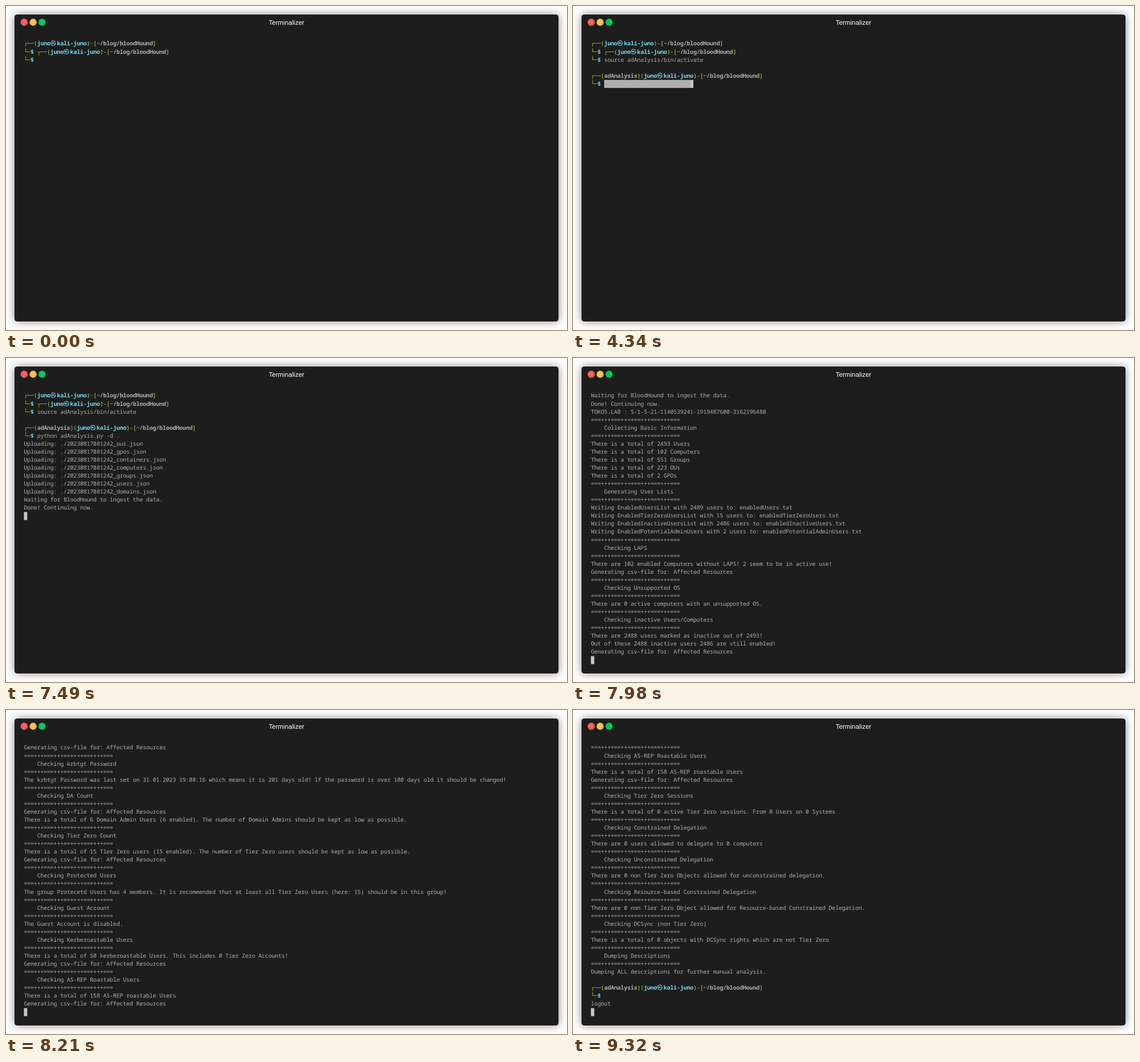
An HTML page that plays this animation: 984x569 px, repeating every 9720 ms.

```html
<!DOCTYPE html>
<html lang="en">
<head>
<meta charset="utf-8">
<title>Terminalizer</title>
<style>
  html, body { margin: 0; width: 100%; height: 100%; overflow: hidden; background: #fff; }
  #stage {
    position: absolute; left: 0; top: 0; width: 1189px; height: 688px;
    transform: scale(.82759, .82703); transform-origin: 0 0;
  }
  #stage div { position: absolute; }
  #frame { left: 18px; top: 18px; width: 1153px; height: 652px; border-radius: 6px;
    background: #1d1d1d; box-shadow: 0 0 18px #888; }
  .dot { top: 9px; width: 15px; height: 15px; border-radius: 50%; }
  #title { top: 9px; width: 100%; text-align: center; color: #fff;
    font: 14px/16px "Liberation Sans", Arial, sans-serif; text-rendering: geometricPrecision; }
  #term { left: 20px; top: 54px; width: 1113px; height: 578px; }
  #text { left: 0; top: -1px; width: 100%; color: #afafaf; white-space: pre;
    font: 12px/17px "Noto Sans Mono", "Noto Sans CJK KR", "Noto Sans CJK JP", monospace;
    font-variant-ligatures: none; text-rendering: geometricPrecision; }
  #text p { margin: 0; height: 17px; }
  #cursor, #paste { height: 17px; }
  #cursor { width: 7px; background: #c7c7c7; }
  #paste { background: #afafaf; }
  .green { color: #b3e33b; }
  .blue { color: #75dff2; font-weight: bold; }
  .bold { font-weight: bold; }
  .wide { display: inline-block; width: 14px; line-height: 0; letter-spacing: 0; }
</style>
</head>
<body>
<div id="stage">
  <div id="frame">
    <div class="dot" style="left:13px;background:#ff5f58"></div>
    <div class="dot" style="left:32px;background:#ffbd50"></div>
    <div class="dot" style="left:51px;background:#00ca56"></div>
    <div id="title">Terminalizer</div>
    <div id="term">
      <div id="paste"></div>
      <div id="cursor"></div>
      <div id="text"></div>
    </div>
  </div>
</div>
<script>
const LOOP = 9720, ROWS = 34, CELL_W = 7, CELL_H = 17;
const $ = id => document.getElementById(id);
const text = $("text"), cursor = $("cursor"), paste = $("paste");

const span = (cls, s) => `<span class="${cls}">${s}</span>`;
const prompt = env =>
  span("green", "┌──(") +
  (env ? span("bold", "adAnalysis") + span("green", ")(") : "") +
  span("blue", `juno${span("wide", "㉿")}kali-juno`) +
  span("green", ")-[") + span("bold", "~/blog/bloodHound") + span("green", "]");
const ps = span("green", "└─") + span("blue", "$") + " ";

const rule = "===+++===+++===+++===+++===";
const section = (name, ...lines) => [rule, "    " + name, rule, ...lines];
const csv = "Generating csv-file for: Affected Resources";
const total = s => "There is a total of " + s;
const write = (list, n, file) => `Writing ${list} with ${n} users to: ${file}.txt`;

const log = [
  prompt(false),
  ps + prompt(false),
  ps + "source adAnalysis/bin/activate",
  "",
  prompt(true),
  ps + "python adAnalysis.py -d .",
  ..."ous gpos containers computers groups users domains".split(" ")
    .map(s => `Uploading: ./20230817081242_${s}.json`),
  "Waiting for BloodHound to ingest the data.",
  "Done! Continuing now.",
  "TOKO5.LAB : S-1-5-21-1140539241-1919487600-3162196480",
  ...section("Collecting Basic Information",
    ...["2493 Users", "102 Computers", "551 Groups", "223 OUs", "2 GPOs"].map(total)),
  ...section("Generating User Lists",
    write("EnabledUsersList", 2489, "enabledUsers"),
    write("EnabledTierZeroUsersList", 15, "enabledTierZeroUsers"),
    write("EnabledInactiveUsersList", 2486, "enabledInactiveUsers"),
    write("EnabledPotentialAdminUsers", 2, "enabledPotentialAdminUsers")),
  ...section("Checking LAPS",
    "There are 102 enabled Computers without LAPS! 2 seem to be in active use!", csv),
  ...section("Checking Unsupported OS",
    "There are 0 active computers with an unsupported OS."),
  ...section("Checking inactive Users/Computers",
    "There are 2488 users marked as inactive out of 2493!",
    "Out of these 2488 inactive users 2486 are still enabled!", csv),
  ...section("Checking krbtgt Password",
    "The krbtgt Password was last set on 31.01.2023 19:08:16 which means it is 201 days old! " +
    "If the password is over 180 days old it should be changed!"),
  ...section("Checking DA Count", csv,
    total("6 Domain Admin Users (6 enabled). The number of Domain Admins should be kept as low as possible.")),
  ...section("Checking Tier Zero Count",
    total("15 Tier Zero users (15 enabled). The number of Tier Zero users should be kept as low as possible."), csv),
  ...section("Checking Protected Users",
    "The group Protecetd Users has 4 members. It is recommended that at least " +
    "all Tier Zero Users (here: 15) should be in this group!"),
  ...section("Checking Guest Account", "The Guest Account is disabled."),
  ...section("Checking Kerberoastable Users",
    total("50 kerberoastable Users. This includes 0 Tier Zero Accounts!"), csv),
  ...section("Checking AS-REP Roastable Users", total("158 AS-REP roastable Users"), csv),
  ...section("Checking Tier Zero Sessions",
    total("0 active Tier Zero sessions. From 0 Users on 0 Systems")),
  ...section("Checking Constrained Delegation",
    "There are 0 users allowed to delegate to 0 computers"),
  ...section("Checking Unconstrained Delegation",
    "There are 0 non Tier Zero Objects allowed for unconstrained delegation."),
  ...section("Checking Resource-based Constrained Delegation",
    "There are 0 non Tier Zero Object allowed for Resource-based Constrained Delegation."),
  ...section("Checking DCSync (non Tier Zero)",
    total("0 objects with DCSync rights which are not Tier Zero")),
  ...section("Dumping Descriptions", "Dumping ALL descriptions for further manual analysis."),
  "",
  prompt(true),
  ps,
  "logout",
];

// [time, finished lines, pasted cells at an open prompt]
const steps = [
  [0, 2, 0], [2000, 2, 30], [2340, 5, 0], [4340, 5, 26], [4710, 6],
  ...Array.from({ length: 8 }, (_, i) => [4880 + i * 610 / 7, 7 + i]),
  [7490, 15], [7590, 19], [7690, 27], [7790, 34], [7890, 43], [7980, 46], [8030, 49],
  [8110, 60], [8210, 78], [8310, 82], [8360, 90], [8410, 98], [8460, 102],
  [8500, 104, 0], [9320, 106],
];

function draw([time, count, pasted]) {
  const open = pasted !== undefined;
  const first = Math.max(0, count + 1 - ROWS);
  const rows = log.slice(first, count);
  const top = rows.length * CELL_H + "px";
  if (open) rows.push(ps);
  text.innerHTML = rows.map(s => `<p>${s}</p>`).join("");
  paste.style.top = cursor.style.top = top;
  paste.style.left = 4 * CELL_W + "px";
  paste.style.width = (pasted || 0) * CELL_W + "px";
  cursor.style.left = (open ? 4 + pasted : 0) * CELL_W + "px";
  cursor.style.visibility = time ? "visible" : "hidden";
}

// Fit the font's own advance to the terminal cell.
function fitCells() {
  text.innerHTML = `<span>${"0".repeat(100)}</span>`;
  text.style.letterSpacing = CELL_W - text.firstChild.offsetWidth / 100 + "px";
}

let shown;
const start = performance.now();
function tick() {
  const t = (performance.now() - start) % LOOP;
  const step = steps.findLast(s => s[0] <= t) || steps[0];
  if (step !== shown) draw(shown = step);
  requestAnimationFrame(tick);
}
fitCells();
tick();
</script>
</body>
</html>
```
